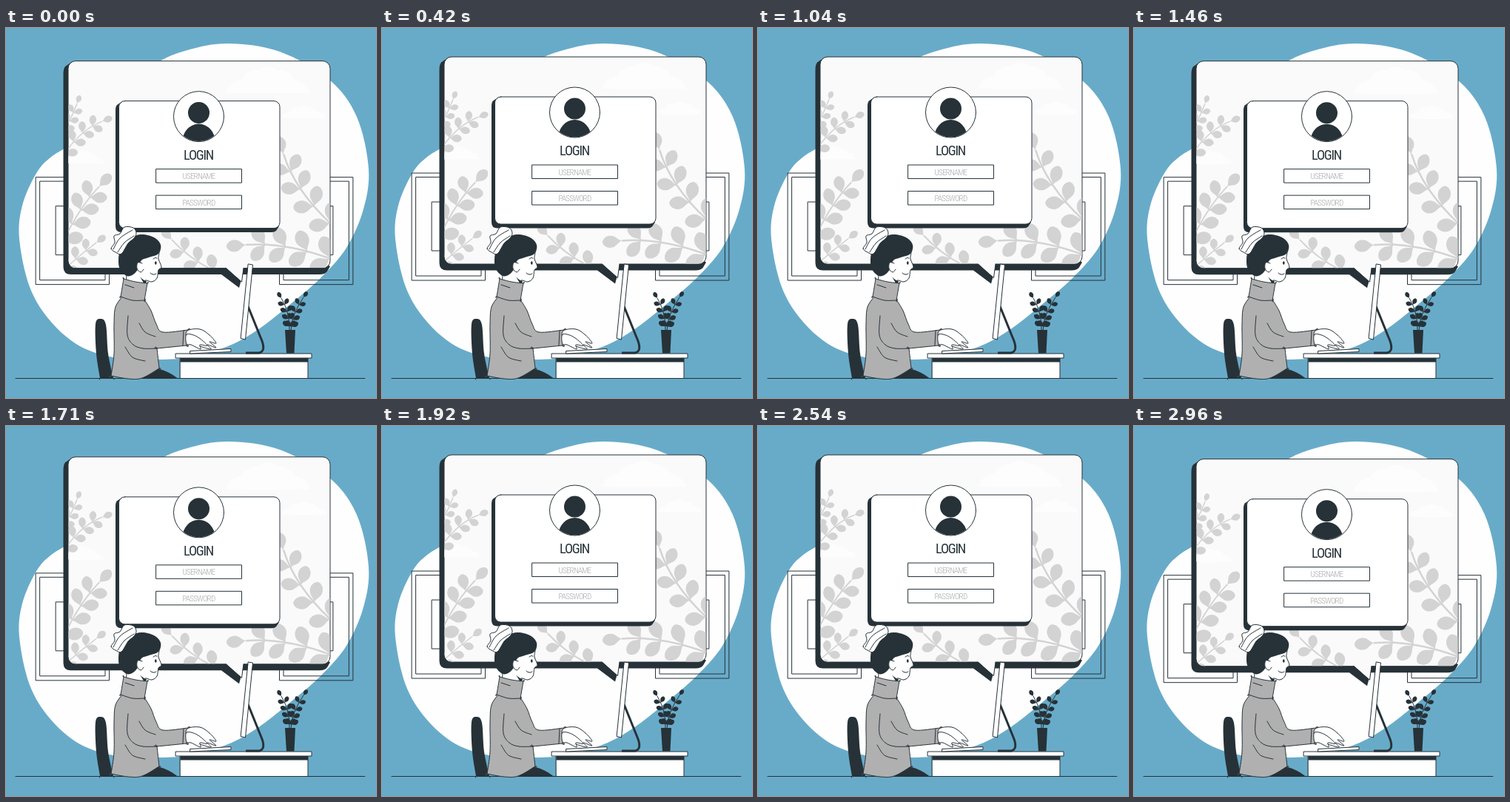
Write an HTML page that moves like this. It is 500 px wide and 500 px high and loops after 3000 ms.

```html
<!DOCTYPE html>
<html lang="en">
<head>
<meta charset="utf-8">
<title>Login</title>
<style>
html, body { margin: 0; width: 100%; height: 100%; overflow: hidden; background: #68abc9; }
svg { display: block; width: 100%; height: 100%; }
.line, .white, .wool { stroke: #263238; stroke-linecap: round; stroke-linejoin: round; }
.line { fill: none; }
.white { fill: #fff; }
.wool { fill: #b0b0b0; }
.dark { fill: #263238; }
text { font-family: 'Roboto Condensed', Roboto, 'Open Sans', sans-serif; font-stretch: 75%; text-anchor: middle; }
.title { font-size: 18.5px; letter-spacing: -1.3px; }
.hint { font-size: 11px; letter-spacing: -.75px; font-weight: 300; fill: #a8a8a8; }
</style>
</head>
<body>
<svg viewBox="0 0 500 500">
  <defs>
    <clipPath id="screen"><rect x="84.5" y="45" width="353" height="279" rx="9"/></clipPath>
    <clipPath id="disc"><circle cx="260.5" cy="119.5" r="33.5"/></clipPath>
  </defs>

  <polygon class="soft" fill="#fefefe" points="301,21 370,32 437,70 474,120 490,190 483,245 460,297 425,338 381,376 340,408 300,430 250,445 200,448 150,446 100,430 60,396 32,350 18,285 22,240 40,198 60,175 100,148 145,98 200,50 245,30"/>

  <g id="float">
    <g id="frame" class="line">
      <rect x="40.5" y="201.5" width="99" height="145"/>
      <rect x="46" y="207" width="88" height="133.5"/>
      <rect x="67.5" y="240.5" width="45" height="66"/>
    </g>
    <use href="#frame" transform="matrix(-1 0 0 1 509 0)"/>

    <path class="dark" d="M90 45L80 52Q77.500 55 77.500 62V323Q77.500 333 88 333H291L315 351L320 333H424Q431 333 434 329L438 322L400 300L100 60Z"/>
    <rect x="84" y="44.500" width="354" height="280" rx="10" fill="#fafafa" stroke="#263238"/>
    <path fill="#fafafa" d="M297 323.500L318.500 343L321 323.500Z"/>
    <path class="line" d="M297 324.500L318.500 343L321 324.500"/>
    <g clip-path="url(#screen)">
      <g id="clouds" fill="#fdfdfd"></g>
      <g id="leaves" fill="#d3d3d3" stroke="#d3d3d3"></g>
    </g>

    <path class="dark" d="M158 98.500L150 104Q148 106 148 111V268Q148 276 156 276H359Q363 276 365 274L369 268Z"/>
    <rect class="white" x="152.500" y="98.500" width="217.500" height="172" rx="8"/>
    <circle class="white" cx="260.500" cy="119.500" r="34"/>
    <g class="dark" clip-path="url(#disc)">
      <circle cx="260.500" cy="114.500" r="14.500"/>
      <ellipse cx="260.500" cy="153" rx="22" ry="23.500"/>
    </g>
    <text class="dark title" x="260" y="177.500">LOGIN</text>
    <rect class="white" x="203" y="190.500" width="115.500" height="18.500"/>
    <rect class="white" x="203" y="226" width="115.500" height="18.500"/>
    <text class="hint" x="260.500" y="204">USERNAME</text>
    <text class="hint" x="260.500" y="239.500">PASSWORD</text>
  </g>

  <path class="line" d="M13 473.500H485"/>
  <polygon class="soft dark" points="121,400 128,393 135,401 138,440 145,473 145,473 127,473 127,473 122,440"/>
  <path class="dark" d="M181 473.500L205 460Q222 465 232 473.500Z"/>

  <!-- head -->
  <polygon class="soft white" points="170,312 204,300 206,312 210,323 206,327 204,338 197,343 188,341 188,350 164,347"/>
  <path class="dark" d="M181 336Q185 341 190 342L188 348Z"/>
  <polygon class="soft dark" points="152,313 155,298 165,286 182,279 200,283 209,293 206,305 193,310 183,314 179,325 172,333 163,335 154,326"/>
  <polyline class="soft white" points="184,318 178,317 177,325 182,330 186,326"/>
  <path class="line" d="M199 312Q202 309 204 311M195 331Q199 335 203 332"/>
  <ellipse class="dark" cx="202.300" cy="317.500" rx="1.300" ry="2.200"/>
  <polygon class="soft white" points="142,298 147,290 146,281 154,278 160,269 172,270 176,277 173,284 165,291 156,305 148,303"/>
  <polyline class="soft line" points="145,299 154,284 171,273"/>
  <polyline class="soft line" points="151,303 160,290 173,281"/>

  <!-- body: a doubled point makes a corner -->
  <polygon class="soft wool" points="158,362 158,362 148,377 146,400 146,440 142,470 142,470 165,474 184,473 207,460 207,460 204,433 204,433 244,429 244,429 246,408 246,408 212,411 203,400 196,382 187,367 187,367"/>
  <polygon class="soft wool" points="159,339 159,339 175,343 191,345 191,345 187,368 187,368 171,368 155,363 155,363"/>
  <polyline class="soft line" points="165,389 164,415 172,428 185,433 204,433"/>
  <polyline class="soft line" points="180,399 188,411 202,417"/>
  <polyline class="soft line" points="161,431 171,445 188,450"/>
  <path class="line" d="M161 347L173 351M240 409L239 429"/>

  <!-- desk -->
  <rect class="white" x="235.500" y="446" width="172.500" height="27.500"/>
  <rect class="dark" x="235.500" y="446" width="172.500" height="5.500"/>
  <rect class="white" x="229.500" y="440" width="183.500" height="6"/>
  <path fill="none" stroke="#263238" stroke-width="3" d="M327 376L346 423Q351 437 342 439H324"/>
  <path class="white" d="M327.500 319L333.500 320L323.500 421L317.500 419.500Z"/>
  <path class="white" d="M249 436.500L304 433.500V437.500L249 440Z"/>
  <polygon class="soft white" points="245,409 262,407 275,415 284,426 275,424 284,432 272,428 277,434 260,429 245,420"/>
  <polygon class="soft white" points="244,414 258,417 272,429 262,428 263,434 250,428 244,427"/>

  <g id="pot" class="dark" stroke="#263238">
    <path stroke="none" d="M377 408H391L389.500 439.500H379Z"/>
  </g>
</svg>
<script>
const $ = id => document.getElementById(id);
const leaves = $('leaves'), pot = $('pot'), clouds = $('clouds'), float = $('float');

// Replace key points with a Catmull-Rom curve through them.
function soften(shape) {
  const pts = shape.getAttribute('points').split(' ').map(p => p.split(',').map(Number));
  const n = pts.length, closed = shape.tagName === 'polygon';
  const at = i => closed ? pts[(i + n) % n] : pts[Math.max(0, Math.min(n - 1, i))];
  let d = 'M' + pts[0];
  for (let i = 0; i < (closed ? n : n - 1); i++) {
    const [a, b, c, e] = [at(i - 1), at(i), at(i + 1), at(i + 2)];
    d += `C${b.map((v, k) => v + (c[k] - a[k]) / 6)} ${c.map((v, k) => v - (e[k] - b[k]) / 6)} ${c}`;
  }
  const path = document.createElementNS('http://www.w3.org/2000/svg', 'path');
  path.setAttribute('d', d);
  path.setAttribute('class', shape.getAttribute('class'));
  if (shape.hasAttribute('fill')) path.setAttribute('fill', shape.getAttribute('fill'));
  shape.replaceWith(path);
}

// A curved stem with paired leaves that shrink towards a leaf at the tip.
function sprig(host, [x0, y0], [cx, cy], [x1, y1], pairs, size, weight) {
  let out = `<path fill="none" stroke-width="${weight}" d="M${x0} ${y0}Q${cx} ${cy} ${x1} ${y1}"/>`;
  for (let i = 0; i <= pairs; i++) {
    const t = .12 + .88 * i / pairs, u = 1 - t;
    const x = u * u * x0 + 2 * u * t * cx + t * t * x1;
    const y = u * u * y0 + 2 * u * t * cy + t * t * y1;
    const dir = Math.atan2(u * (cy - y0) + t * (y1 - cy), u * (cx - x0) + t * (x1 - cx)) * 180 / Math.PI;
    const len = size * (1.1 - .2 * t);
    for (const turn of i < pairs ? [-52, 52] : [0])
      out += `<path stroke="none" transform="translate(${x} ${y}) rotate(${dir + turn}) scale(${len})" ` +
        'd="M0 0C.25 -.08 .3 -.32 .62 -.31C.85 -.3 1 -.12 1 0C1 .12 .85 .3 .62 .31C.3 .32 .25 .08 0 0Z"/>';
  }
  host.innerHTML += out;
}

function cloud(x, base, width, height) {
  for (let i = 0; i < 5; i++) {
    const rise = height * Math.sin(Math.PI * (i + 1) / 6);
    clouds.innerHTML += `<path d="M${x + width * i / 7} ${base}a${width * 1.5 / 7} ${rise} 0 0 1 ${width * 3 / 7} 0z"/>`;
  }
}

document.querySelectorAll('.soft').forEach(soften);

cloud(298, 88, 112, 36);
cloud(372, 122, 60, 17);
cloud(72, 183, 60, 18);

sprig(leaves, [76, 140], [88, 124], [96, 102], 3, 13, 1.5);
sprig(leaves, [74, 178], [98, 138], [130, 126], 4, 16, 1.5);
sprig(leaves, [72, 300], [96, 245], [126, 214], 4, 25, 2);
sprig(leaves, [74, 330], [98, 308], [122, 290], 3, 17, 1.5);
sprig(leaves, [290, 332], [252, 316], [224, 286], 3, 21, 2);
sprig(leaves, [452, 276], [392, 225], [375, 170], 4, 27, 2.5);
sprig(leaves, [455, 318], [382, 288], [324, 293], 4, 29, 2.5);
sprig(pot, [383, 409], [384, 385], [372, 365], 4, 10, 1);
sprig(pot, [385, 409], [386, 387], [402, 364], 4, 10, 1);

// Linear rise of 10 px and back, every 1.5 s.
function draw() {
  const phase = (performance.now() + 20) % 1500 / 750;
  const rise = 10 * (1 - Math.abs(1 - phase));
  float.setAttribute('transform', `translate(0 ${.4 - rise})`);
  requestAnimationFrame(draw);
}
draw();
</script>
</body>
</html>
```
